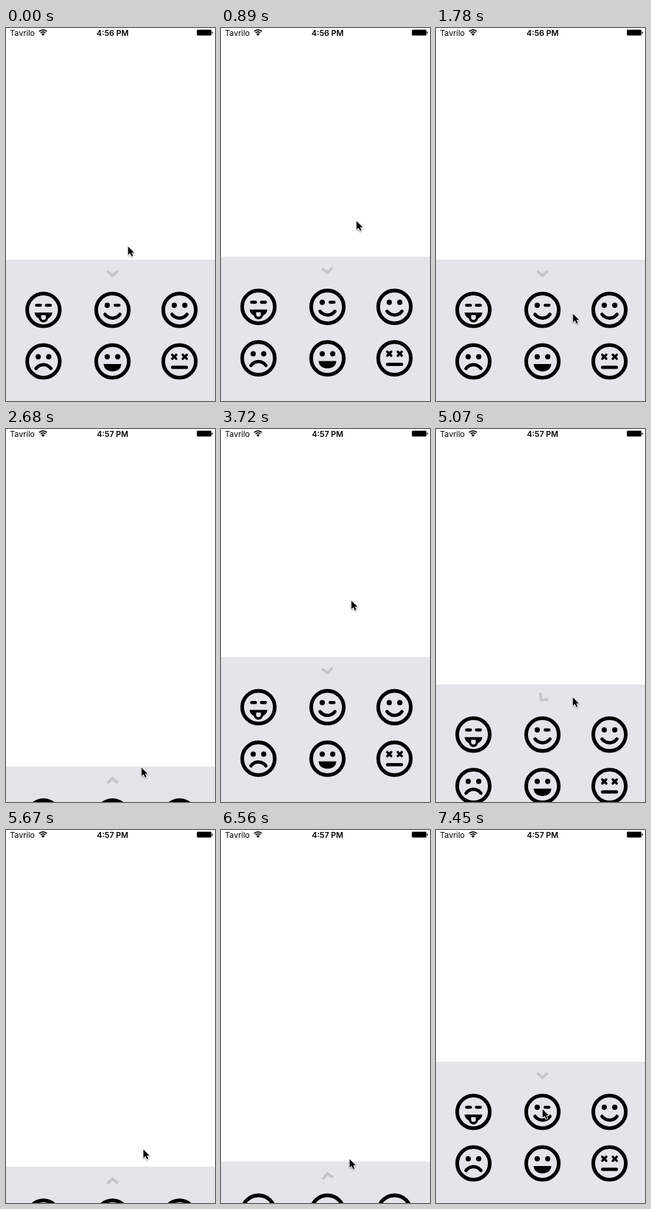
Recreate the animation shown at these times as an HTML page with a canvas. Size 318x565 px, loop 8000 ms.

```html
<!DOCTYPE html>
<html lang="en">
<head>
<meta charset="utf-8">
<title>Sliding emoji drawer</title>
<style>
html, body { margin: 0; width: 100%; height: 100%; overflow: hidden; background: #fefefe; }
canvas { display: block; width: 318px; height: 565px; }
</style>
</head>
<body>
<canvas id="stage"></canvas>
<script>
const W = 318, H = 565, LOOP = 8000;
const OPEN_Y = 351, TRAVEL = 160, GRIP_Y = 362;
const PANEL = '#e4e5e9', INK = '#000', PAPER = '#fefefe';
const STEP = 149, LAST_STEP = 50, CLOCK_STEP = 14, FIRST_GRAB = 4;

const canvas = document.getElementById('stage');
const ctx = canvas.getContext('2d');
const ratio = window.devicePixelRatio || 1;
canvas.width = W * ratio;
canvas.height = H * ratio;

const clamp = p => Math.max(0, Math.min(1, p));
const easeOut = p => 1 - (1 - p) ** 2;
const smooth = p => p * p * (3 - 2 * p);
const mix = (a, b, p) => a + (b - a) * p;

// Pointer strokes: the hand rests between them
const strokes = [
  { from: 0, to: 3, x: 207, y: GRIP_Y },
  { from: 4, to: 8, x: 205, y: 268 },
  { from: 8, to: 10, x: 208.5, y: 403 },
  { from: 11, to: 18, x: 205.5, y: 512 },
  { from: 18, to: 23, x: 200, y: 342 },
  { from: 24, to: 28.5, x: 194, y: 132 },
  { from: 28.5, to: 31, x: 207, y: GRIP_Y },
  { from: 33, to: 38, x: 208.3, y: 483 },
  { from: 38, to: 42, x: 207, y: 525 },
  { from: 43, to: 50, x: 161.5, y: 422 }
];

// Drawer glides between open (0) and closed (1)
const glides = [
  { from: 12, to: 16, closed: 1 },
  { from: 18, to: 23, closed: 0 },
  { from: 32.1, to: 38.3, closed: 1 },
  { from: 43, to: 50, closed: 0 }
];

const progress = (part, step) => clamp((step - part.from) / (part.to - part.from));

function pointerAt(step) {
  return strokes.reduce(([x, y], s) => {
    const p = easeOut(progress(s, step));
    return [mix(x, s.x, p), mix(y, s.y, p)];
  }, [185, 330]);
}

function drawerAt(step, pointerY) {
  const closed = glides.reduce((v, g) => mix(v, g.closed, smooth(progress(g, step))), 0);
  const pull = step < FIRST_GRAB ? 0 : Math.max(0, GRIP_Y - pointerY);
  return closed * TRAVEL - 0.55 * Math.sqrt(pull);
}

function line(points, width, color = INK, cap = 'round') {
  ctx.beginPath();
  points.forEach(([x, y]) => ctx.lineTo(x, y));
  ctx.lineWidth = width;
  ctx.strokeStyle = color;
  ctx.lineCap = cap;
  ctx.stroke();
}

function arc(x, y, r, a, b, width, cap = 'butt') {
  ctx.beginPath();
  ctx.arc(x, y, r, a, b);
  ctx.lineWidth = width;
  ctx.strokeStyle = INK;
  ctx.lineCap = cap;
  ctx.stroke();
}

function box(x, y, w, h, r, color) {
  ctx.beginPath();
  ctx.roundRect(x, y, w, h, r);
  ctx.fillStyle = color;
  ctx.fill();
}

const dotEye = x => box(x - 4, -11, 8, 8, 4, INK);
const dashEye = x => line([[x - 3, -7], [x + 3, -7]], 4.6);

function crossEye(x) {
  line([[x - 3, -10], [x + 3, -4]], 3.6);
  line([[x - 3, -4], [x + 3, -10]], 3.6);
}

// Circular bow around the vertical axis, turned up or down
function bow(peakY, up) {
  const r = 14, half = 0.94, mid = up * Math.PI / 2;
  arc(0, peakY - up * r, r, mid - half, mid + half, 5, 'round');
}

function openMouth(bottom) {
  ctx.beginPath();
  ctx.moveTo(-13.5, 4);
  ctx.lineTo(13.5, 4);
  ctx.bezierCurveTo(13, bottom - 3, 6, bottom, 0, bottom);
  ctx.bezierCurveTo(-6, bottom, -13, bottom - 3, -13.5, 4);
  ctx.fillStyle = INK;
  ctx.fill();
}

function tongueMouth() {
  openMouth(14.5);
  box(-7, 7, 14, 12, [0, 0, 7, 7], INK);
  box(-3.6, 8, 7.2, 7, [1, 1, 3.6, 3.6], PANEL);
}

const smile = () => bow(12.4, 1);
const faces = [
  () => { dashEye(-7.5); dashEye(7.5); tongueMouth(); },
  () => { dotEye(-8); dashEye(7); smile(); },
  () => { dotEye(-8); dotEye(8); smile(); },
  () => { dotEye(-8); dotEye(8); bow(5, -1); },
  () => { dotEye(-8); dotEye(8); openMouth(15.2); },
  () => { crossEye(-8); crossEye(8); line([[-10.5, 9], [10.5, 9]], 5); }
];

function at(x, y, draw, angle = 0) {
  ctx.save();
  ctx.translate(x, y);
  ctx.rotate(angle);
  draw();
  ctx.restore();
}

function drawDrawer(offset) {
  const top = OPEN_Y + offset;
  ctx.fillStyle = PANEL;
  ctx.fillRect(0, top, W, H - top);
  at(162, top + 21.3, () => {
    line([[-8, -4.3], [0, 3], [8, -4.3]], 4, '#c5c5c8', 'butt');
  }, offset / TRAVEL * Math.PI);
  faces.forEach((face, i) => {
    const x = [57, 162, 264][i % 3];
    const y = top + (i < 3 ? 76 : 154);
    at(x, y, () => {
      arc(0, 0, 24.8, 0, Math.PI * 2, 5.6);
      face();
    });
  });
}

function drawWifi() {
  const up = -Math.PI / 2, spread = Math.PI / 4;
  for (const r of [8.2, 5.2]) arc(56.3, 11, r, up - spread, up + spread, 1.8);
  ctx.beginPath();
  ctx.moveTo(56.3, 11.8);
  ctx.arc(56.3, 11.8, 3.6, up - spread, up + spread);
  ctx.fillStyle = INK;
  ctx.fill();
}

function drawBattery() {
  box(290, 2.2, 23, 9.6, 2, '#777');
  box(291, 3, 21, 8, 1, INK);
  box(313.4, 5.4, 1.3, 3.4, [0, 1, 1, 0], INK);
}

function label(text, x, align, weight) {
  ctx.fillStyle = INK;
  ctx.textAlign = align;
  ctx.font = `${weight} 12px Inter, sans-serif`;
  ctx.fillText(text, x, 11.5);
}

function drawStatus(step) {
  label('Tavrilo', 6, 'left', 400);
  label(step < CLOCK_STEP ? '4:56 PM' : '4:57 PM', 162.2, 'center', 600);
  drawWifi();
  drawBattery();
}

function drawPointer(x, y) {
  at(x, y, () => {
    const shape = new Path2D('M.8 1V13.8L3.8 11 6 15.8 8.2 14.8 6.1 10.2H10Z');
    ctx.save();
    ctx.shadowColor = 'rgba(0,0,0,.4)';
    ctx.shadowBlur = 2 * ratio;
    ctx.shadowOffsetY = ratio;
    ctx.lineWidth = 1.8;
    ctx.lineJoin = 'round';
    ctx.strokeStyle = '#fff';
    ctx.stroke(shape);
    ctx.restore();
    ctx.fillStyle = INK;
    ctx.fill(shape);
  });
}

function render(time) {
  const step = Math.min(LAST_STEP, Math.floor((time % LOOP + 12) / STEP));
  const [x, y] = pointerAt(step);
  ctx.setTransform(ratio, 0, 0, ratio, 0, 0);
  ctx.fillStyle = PAPER;
  ctx.fillRect(0, 0, W, H);
  drawStatus(step);
  drawDrawer(drawerAt(step, y));
  drawPointer(x, y);
}

const start = performance.now();
function tick() {
  render(performance.now() - start);
  requestAnimationFrame(tick);
}
tick();
</script>
</body>
</html>
```
